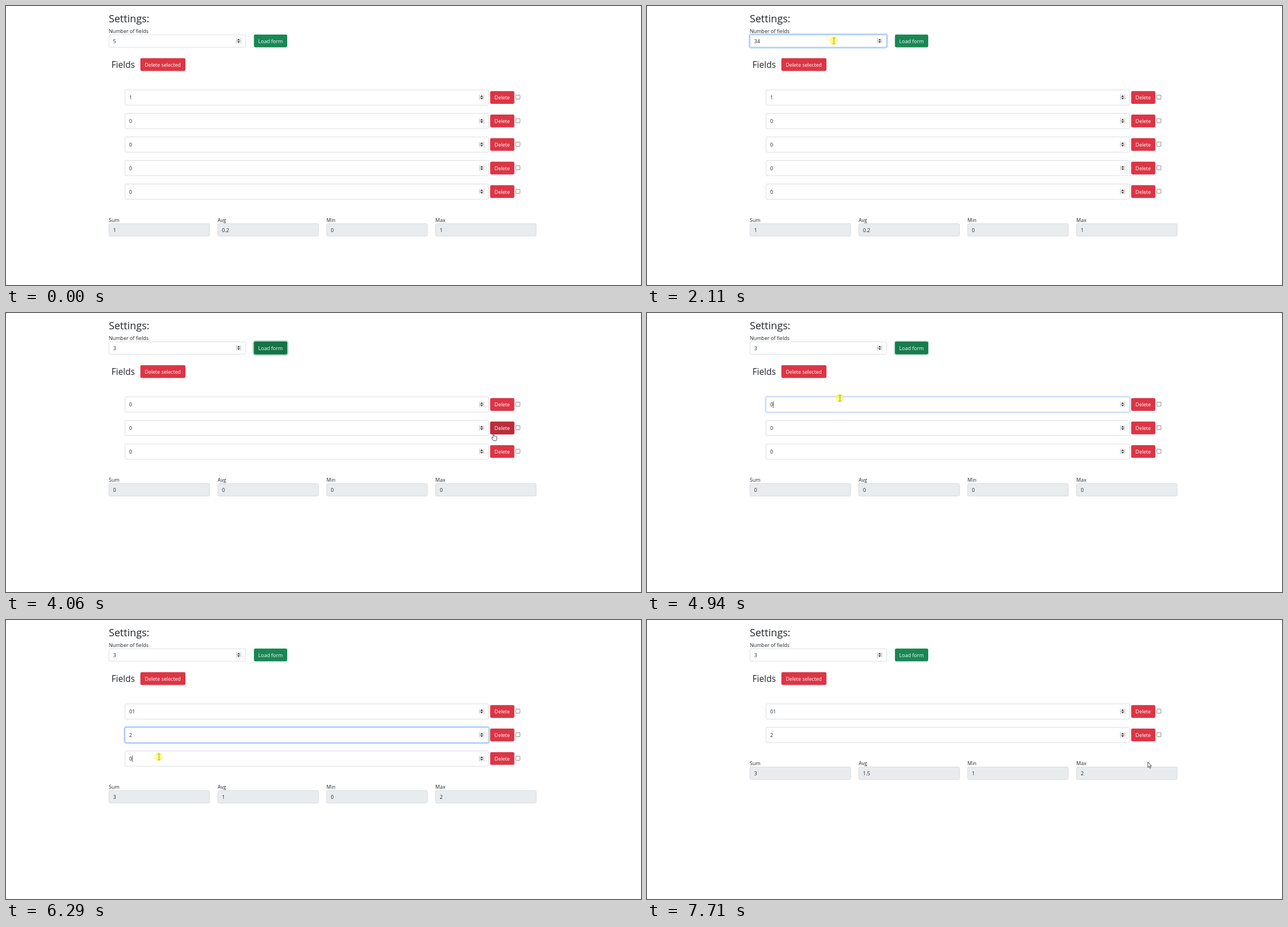
These frames come from a looping animation (1129 by 496 pixels, 8 s). An HTML page:

```html
<!DOCTYPE html>
<html lang="en">
<head>
<meta charset="utf-8">
<title>Form fields</title>
<style>
  html, body { margin: 0; width: 100%; height: 100%; overflow: hidden; background: #fff; }
  svg { display: block; width: 1129px; height: 496px; font: 9px "Open Sans", "Noto Sans", sans-serif; }
</style>
</head>
<body>
<svg id="stage" viewBox="0 0 1129 496"></svg>
<script>
const LOOP = 8000, TICK = 78.7, START = 120, ROW = 41.85, BLINK = 6.7;
const CLICK = 41, LOADED = 43, REMOVE = 95;
const INK = '#212529';
const GREEN = ['#198754', '#157347'], RED = ['#dc3545', '#bb2d3b'];

// Field 0 is the settings input; times are in ticks
const drags = [
  { field: 0, at: 8, x: 330, y: 63, end: 112 },
  { field: 0, at: 25, x: 332.5, y: 62, end: 82 },
  { field: 1, at: 60, x: 343, y: 151.5, end: 135 },
  { field: 2, at: 68, x: 300, y: 200, end: 177 },
  { field: 3, at: 78, x: 272, y: 243.5, end: 167 }
];
const typing = [
  { field: 0, at: 14, value: '3' }, { field: 0, at: 17, value: '34' }, { field: 0, at: 32, value: '3' },
  { field: 1, at: 65, value: '01' }, { field: 2, at: 71, value: '2' }, { field: 3, at: 82, value: '3' }
];
const key = (at, x, y) => ({ at, x, y });
const path = [
  key(0, 781, 464), key(1, 251, 280), key(4, 251, 280), key(20, 465, 62), key(35, 480, 62),
  key(LOADED, 480, 62), key(51, 884, 221), key(52, 884, 221), key(74, 292, 204),
  key(89, 884.5, 264.5), key(92, 890.5, 252.5), key(999, 890.5, 252.5),
  ...drags.flatMap(d => [
    key(d.at - 2, d.x, d.y), key(d.at + 1, d.x, d.y), key(d.at + 3, d.end, d.y), key(d.at + 4, d.end, d.y)
  ])
].sort((a, b) => a.at - b.at);

const clamp = v => Math.max(0, Math.min(1, v));
const fade = (n, from, to) => Math.min(clamp((n - from) / 2), 1 - clamp((n - to) / 2));
const inside = (p, x, y, w, h) => p && p.x > x && p.x < x + w && p.y > y && p.y < y + h;
const last = (list, n) => list.filter(e => e.at <= n).pop();
const ofField = (list, id) => list.filter(e => e.field === id);

function pointer(n) {
  if (n < 0) return null;
  const i = path.findIndex(k => k.at > n), a = path[i - 1], b = path[i];
  const u = (n - a.at) / (b.at - a.at), e = u * u * (3 - 2 * u);
  return { x: a.x + (b.x - a.x) * e, y: a.y + (b.y - a.y) * e };
}

const isPressed = n => n === CLICK || n === CLICK + 1 || n === REMOVE ||
  drags.some(d => n >= d.at && n < d.at + 3);

function valueOf(id, n) {
  const typed = last(ofField(typing, id), n);
  return typed ? typed.value : id ? '0' : '5';
}

function fieldValues(n) {
  if (n < LOADED) return ['1', '0', '0', '0', '0'];
  return (n > REMOVE ? [1, 2] : [1, 2, 3]).map(id => valueOf(id, n));
}

function focusOf(id, n) {
  const own = ofField(drags, id);
  if (!own.length) return { ring: 0 };
  const from = own[0].at, next = drags.find(d => d.field === id + 1);
  const to = id ? (next ? next.at : LOOP) : CLICK;
  const typed = last(ofField(typing, id), n), drag = last(own, n);
  const since = typed ? typed.at : from;
  const live = n >= from && n < (id ? to : LOADED);
  const selected = live && n >= drag.at + 2 && since <= drag.at;
  return {
    ring: fade(n, from, to), selected,
    caret: live && !selected && (n - since) % (2 * BLINK) < BLINK
  };
}

const text = (x, y, s, fill = INK, size = 9) =>
  `<text x="${x}" y="${y}" fill="${fill}" font-size="${size}">${s}</text>`;
const rect = (x, y, w, h, fill, extra = '') =>
  `<rect x="${x}" y="${y}" width="${w}" height="${h}" fill="${fill}" ${extra}/>`;
const box = (x, y, w, h, fill, line = '#ced4da', opacity = 1) =>
  rect(x, y, w, h, fill, `rx="2.4" stroke="${line}" stroke-width=".8" opacity="${opacity}"`);
const ring = (x, y, w, h, color, opacity) =>
  rect(x - 1.2, y - 1.2, w + 2.4, h + 2.4, 'none', `rx="3.4" stroke="${color}" stroke-width="2.4" opacity="${opacity}"`);

const spinner = (x, y) =>
  rect(x - 4.3, y - 4.7, 8.6, 9.4, '#f0f0f0') +
  `<path d="M${x - 4} ${y - 4.7}v9.4M${x + 4} ${y - 4.7}v9.4M${x - 4} ${y}h8" stroke="#bbb" stroke-width=".7"/>` +
  `<path d="M${x - 2.4} ${y - 1}l2.4 -2.6 2.4 2.6zM${x - 2.4} ${y + 1}l2.4 2.6 2.4 -2.6z" fill="#333"/>`;

function input(id, x, y, w, h, value, n) {
  const f = focusOf(id, n), mid = y + h / 2, tx = x + 7.5, tw = value.length * 5.15;
  return ring(x, y, w, h, '#c2dbfe', f.ring) +
    box(x, y, w, h, '#fff') + box(x, y, w, h, 'none', '#86b7fe', f.ring) +
    (f.selected ? rect(tx, mid - 6, tw, 12, '#0078d7') : '') +
    text(tx, mid + 3.6, value, f.selected ? '#fff' : INK) +
    (f.caret ? rect(tx + tw, mid - 5.8, .7, 12, '#222') : '') +
    spinner(x + w - 12.6, mid - .2);
}

function button(x, y, w, label, colors, p, focused = 0) {
  const h = 22.7, dark = inside(p, x, y, w, h) ? 1 : focused;
  return ring(x, y, w, h, '#9dccb6', focused * .7) +
    rect(x, y, w, h, colors[0], 'rx="2.4"') +
    rect(x, y, w, h, colors[1], `rx="2.4" opacity="${dark}"`) +
    text(x + 7.8, y + 15.2, label, '#fff');
}

const shapes = {
  hand: 'M-.8 .3Q0 -.7 .9 .3V4.6Q2 4 2.7 4.9Q4 4.5 4.5 5.4Q6 5.2 6.1 6.6V9.2L5 12.7H-.3L-3 8.6Q-3.6 7 -2.1 7.1L-.8 8.2Z',
  beam: 'M-2.5 -5.3H-.7L0 -4.7L.7 -5.3H2.5M0 -4.7V4.7M-2.5 5.3H-.7L0 4.7L.7 5.3H2.5',
  arrow: 'M0 0V9.7L2.2 7.6L3.8 11.2L5.3 10.5L3.7 7H6.7Z'
};

function cursor(p, n, rows) {
  const pressed = isPressed(n);
  const overRow = (x, y, w, h) => rows.some((_, i) => inside(p, x, y + i * ROW, w, h));
  const onButton = inside(p, 441, 51, 59, 22.5) || inside(p, 239, 93, 80, 22.5) || overRow(861, 151.3, 43, 22.5);
  const onInput = pressed || inside(p, 183, 51, 243, 22.5) || overRow(211, 149, 647, 27.4);
  const kind = onButton ? 'hand' : onInput ? 'beam' : 'arrow';
  const look = kind === 'beam' ? 'fill="none" stroke="#555" stroke-width=".65"' : 'fill="#fff" stroke="#222" stroke-width=".8"';
  return `<g transform="translate(${p.x} ${p.y})">` +
    (pressed ? `<circle cx="${onButton ? 0 : -1}" cy="-.5" r="7.5" fill="#ff0" opacity=".5"/>` : '') +
    `<path d="${shapes[kind]}" ${look} stroke-linejoin="round"/></g>`;
}

function draw(n) {
  const p = pointer(n), rows = fieldValues(n), nums = rows.map(Number);
  let s = text(182.7, 28.5, 'Settings:', INK, 18.2) + text(182.7, 47.8, 'Number of fields') +
    input(0, 183, 51.1, 243.2, 22.2, valueOf(0, n), n) +
    button(440.8, 50.8, 59.2, 'Load form', GREEN, p, fade(n, CLICK + 1, 60)) +
    text(187.6, 109.9, 'Fields', INK, 15.5) +
    button(238.9, 92.7, 80.1, 'Delete selected', RED, p);
  rows.forEach((value, i) => {
    const y = i * ROW;
    s += input(i + 1, 211.5, 149.1 + y, 646.8, 27.1, value, n) +
      button(860.8, 151.2 + y, 43, 'Delete', RED, p) +
      rect(906.5, 158.4 + y, 7.3, 7.3, '#fff', 'rx=".8" stroke="#666" stroke-width=".8"');
  });
  const top = 386.9 - (5 - rows.length) * ROW, sum = nums.reduce((a, b) => a + b);
  const totals = { Sum: sum, Avg: sum / nums.length, Min: Math.min(...nums), Max: Math.max(...nums) };
  Object.entries(totals).forEach(([label, value], i) => {
    const x = 183 + i * 193.55;
    s += text(x - .3, top - 3.1, label) + box(x, top, 179, 22.2, '#e9ecef') + text(x + 7.5, top + 15, value);
  });
  return s + (p ? cursor(p, n, rows) : '');
}

const stage = document.getElementById('stage');
let shown = null;
function frame() {
  const n = Math.floor((performance.now() % LOOP - START) / TICK);
  if (n !== shown) stage.innerHTML = draw(shown = n);
  requestAnimationFrame(frame);
}
frame();
</script>
</body>
</html>
```
